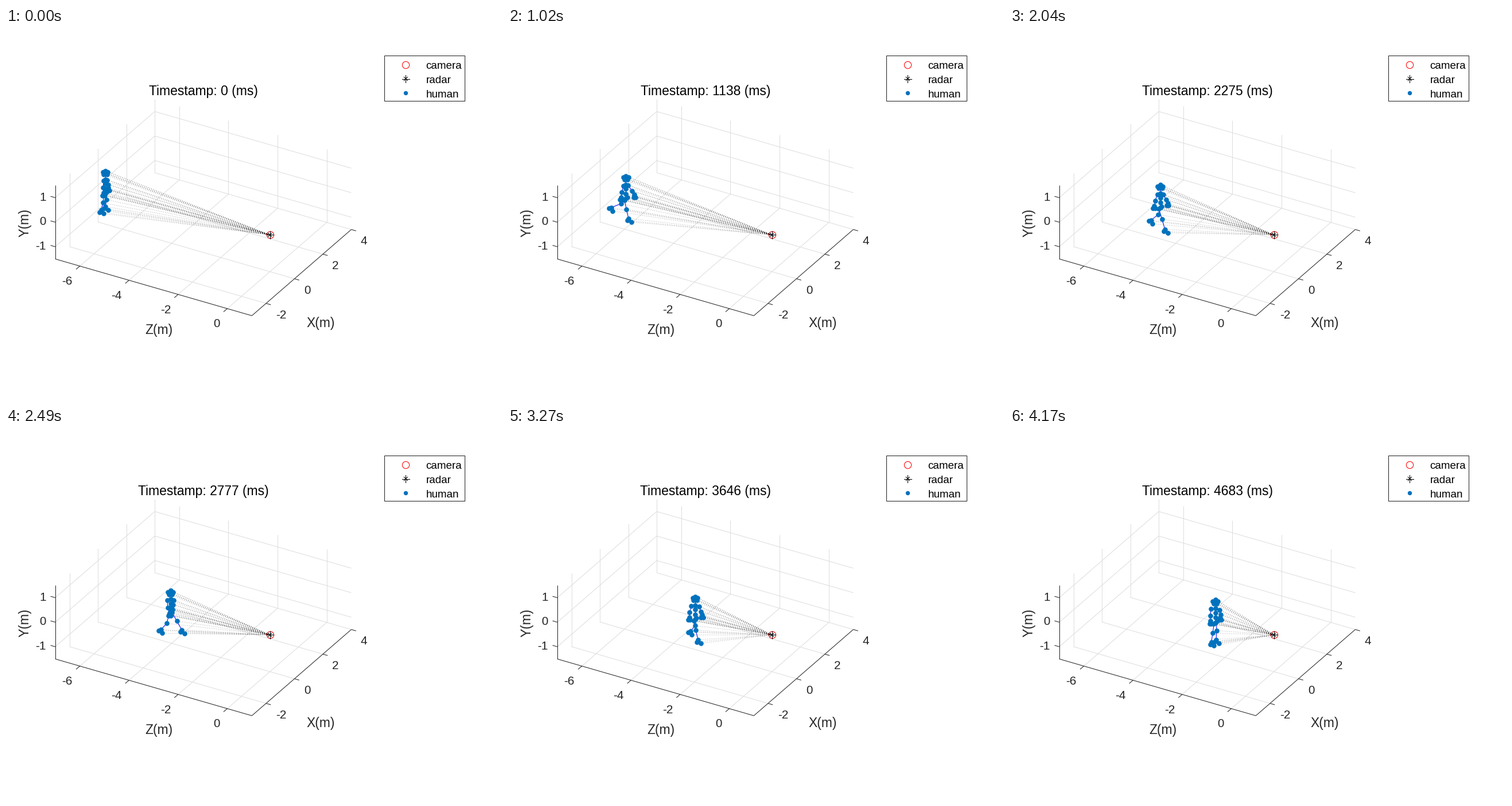
Animation, 864 px wide and 648 px high, one loop 4200 ms. Source, as a matplotlib script:

```python
import math

import matplotlib.pyplot as plt
import numpy as np
from matplotlib.animation import FuncAnimation
from matplotlib.collections import LineCollection
from matplotlib.patches import Rectangle

W, H, FRAMES, STEP = 864, 648, 140, 30
DARK, BLUE, GRID = "#262626", "#0072BD", "#dedede"
plt.rcParams["font.family"] = "Liberation Sans"
plt.rcParams["lines.scale_dashes"] = False

# 72 dpi makes one point equal one pixel
fig = plt.figure(figsize=(W / 72, H / 72), dpi=72, facecolor="white")
ax = fig.add_axes([0, 0, 1, 1])
ax.set(xlim=(0.6, W + 0.6), ylim=(H, 0))
ax.axis("off")


# ---------- static scene ----------
def project(x, y, z):
    return np.array([460.3 + 24.75 * x + 42.8 * z,
                     360.4 - 21.45 * x - 42.7 * y + 12.35 * z])


def segment(a, b, color=DARK):
    ax.plot(*zip(a, b), color=color, lw=1.04, solid_capstyle="butt", zorder=1)


def label(x, y, text, size, color=DARK, **kw):
    return ax.text(x, y, text, size=size, color=color, va="baseline", **kw)


X0, X1, Y0, Y1, Z0, Z1 = -3, 4, -1.5, 1.5, -7, 1
XS, YS, ZS = (-2, 0, 2, 4), (-1, 0, 1), (-6, -4, -2, 0)
for x in XS:
    segment(project(x, Y0, Z0), project(x, Y0, Z1), GRID)
    segment(project(x, Y0, Z0), project(x, Y1, Z0), GRID)
for z in ZS:
    segment(project(X0, Y0, z), project(X1, Y0, z), GRID)
    segment(project(X1, Y0, z), project(X1, Y1, z), GRID)
for y in YS:
    segment(project(X0, y, Z0), project(X1, y, Z0), GRID)
    segment(project(X1, y, Z0), project(X1, y, Z1), GRID)

left, corner = project(X0, Y0, Z0), project(X0, Y0, Z1)
segment(left, corner)
segment(corner, project(X1, Y0, Z1))
segment(left, project(X0, Y1, Z0))

TICK, AXIS, LEGEND = 20.8, 22.9, 18.75


def tick(point, out, shift, text, ha):
    segment(point, point + out)
    label(*(point + shift), text, TICK, ha=ha)


for x in XS:
    tick(project(x, Y0, Z1), (8.3, 2.4), (26 if x < 0 else 22, 26), str(x), "center")
for z in ZS:
    tick(project(X0, Y0, z), (-6.5, 5.6), (-22 if z else -19, 32.5), str(z), "center")
for y in YS:
    tick(project(X0, y, Z0), (-8.3, -2.4), (-16, 5), str(y), "right")

label(267, 533.5, "Z(m)", AXIS, ha="center")
label(549, 521.5, "X(m)", AXIS, ha="center")
label(40.5, 339, "Y(m)", AXIS, ha="center", rotation=90, rotation_mode="anchor")
title = label(344.5, 117, "", AXIS, "black", ha="center")


def camera(x, y):
    ax.plot(x, y, "o", ms=12.3, mfc="none", mec="red", mew=1.04, zorder=6)


def radar(x, y):
    for k in range(4):
        a = k * math.pi / 4
        r = 4.4 if k % 2 else 6.2
        dx, dy = r * math.cos(a), r * math.sin(a)
        ax.plot([x - dx, x + dx], [y - dy, y + dy], color="black", lw=1.04, zorder=7)


ax.add_patch(Rectangle((660, 48), 140, 79, fc="white", ec=DARK, lw=1.04))
camera(697, 63.5)
radar(697, 88.5)
ax.plot(697, 113.3, "o", ms=7.4, color=BLUE, mew=0)
for i, name in enumerate(("camera", "radar", "human")):
    label(732, 71 + 25 * i, name, LEGEND, "black", ha="left")

SENSOR = project(0, 0, 0)
camera(*SENSOR)
radar(*SENSOR)

# ---------- walking figure, in metres ----------
START, FIRST_STEP, STEP_LEN, STRIDE_LEAD = -6.7, 12, 18.5, 0.32

# depth of the hips: speed rises, peaks mid-way and falls off
frames = np.arange(FRAMES)
speed = np.interp(frames, (0, 25, 75, 139), (0.003, 0.032, 0.044, 0.016))
depth = START + np.cumsum(speed) - speed[0]


def ease(u):
    u = min(max(u, 0), 1)
    return u * u * (3 - 2 * u)


def landing(k):
    """Depth where step k comes down; even steps are the near foot."""
    if k < 0:
        return START - 0.08
    t = FIRST_STEP + STEP_LEN * (k + 1)
    return min(np.interp(t, frames, depth) + STRIDE_LEAD, depth[-1])


def foot_depth(i, parity):
    """Depth of one foot and how far it is through its swing (0 when planted)."""
    n = math.floor((i - FIRST_STEP) / STEP_LEN)
    if n >= 0 and n % 2 == parity:
        u = (i - FIRST_STEP) / STEP_LEN - n
        a, b = landing(n - 2), landing(n)
        return a + (b - a) * ease(u), u
    return landing(n - 1 if n >= 0 else -1), 0


def ring(center, n, rx, ry):
    a = 2 * np.pi * np.arange(n) / n - np.pi / 2
    return list(center + np.column_stack([rx * np.cos(a), ry * np.sin(a)]))


def leg(hip, ankle, lag):
    """Chain from hip to foot; a trailing leg bends and lifts its heel."""
    back = min(max(lag / 0.35, 0), 1)
    knee = (hip + ankle) / 2 + np.array([3, 2]) * back
    heel = ankle + (-2 - 2 * back, 3.6 - 2.4 * back)
    toe = ankle + (5 - 3 * back, 6)
    return [hip, knee, ankle, heel, toe, ankle]


def pose(i):
    """Joint chains of the figure, in pixels."""
    z = depth[i]
    sway = 0.1 * math.cos(2 * math.pi * (i - 53) / 80) * ease(i / 40)
    ground = np.interp(i, (0, 80), (-0.88, -0.97))
    turn = 0.04 + 0.11 * i / FRAMES

    hips, neck, head = (project(sway, y, z) for y in (-0.25, 0.33, 0.6))
    chains = [[hips + t * (neck - hips) for t in (0, 0.35, 0.7, 1)] + [head],
              ring(head, 5, 4.6, 3.4)]
    for parity, side, drop in ((0, -1, 0.56), (1, 1, 0.42)):
        foot, swing = foot_depth(i, parity)
        shoulder = project(sway + side * 0.05, 0.29, z + side * turn)
        wrist = project(sway + side * 0.09, 0.31 - drop,
                        z + side * turn - 0.35 * (foot - z))
        elbow = (shoulder + wrist) / 2 + (side, 0)
        chains.append([neck, shoulder, elbow, wrist] + ring(wrist, 3, 2, 2.8))

        hip = project(sway + side * 0.1, -0.25, z)
        lift = 0.08 * math.sin(math.pi * swing)
        ankle = project(side * 0.15, ground + lift, foot)
        chains.append([hips] + leg(hip, ankle, z - foot))
    return chains


# dots are counted from the sensor, so neighbouring beams share them
beams = LineCollection([], colors="black", linewidths=0.75, alpha=0.45,
                       linestyles=[(0, (1.0, 2.2))], capstyle="butt", zorder=3)
bones = LineCollection([], colors="blue", linewidths=1.04, zorder=4)
ax.add_collection(beams, autolim=False)
ax.add_collection(bones, autolim=False)
joints, = ax.plot([], [], "o", ms=8.6, color=BLUE, mew=0, zorder=5)


def stamp(i):
    # one sample is dropped late in the recording
    return math.ceil(33.448 * (i + (i >= 124)))


def draw(i):
    chains = pose(i)
    points = np.unique(np.round(np.vstack(chains), 2), axis=0)
    beams.set_segments([(SENSOR, p) for p in points])
    bones.set_segments([np.array(c) for c in chains])
    joints.set_data(points[:, 0], points[:, 1])
    title.set_text(f"Timestamp: {stamp(i)} (ms)")
    return beams, bones, joints, title


anim = FuncAnimation(fig, draw, frames=FRAMES, interval=STEP, repeat=True,
                     repeat_delay=0)
plt.show()
```
